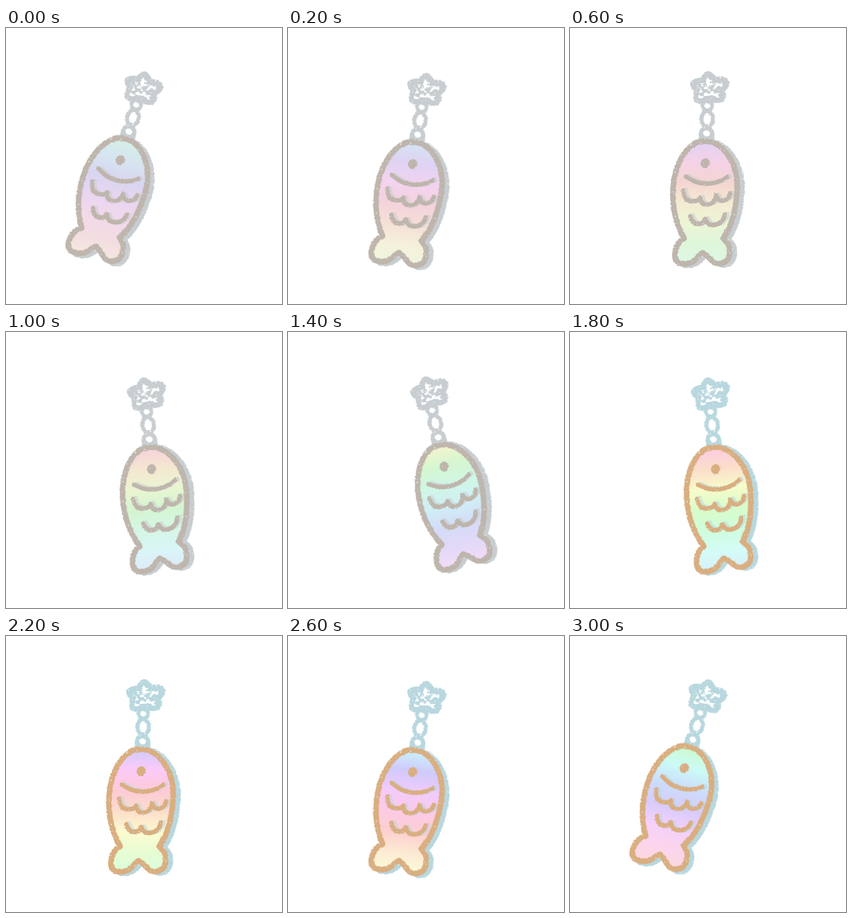
An HTML page that plays this animation: 500 by 500 pixels, repeating every 3200 ms.

```html
<!DOCTYPE html>
<html lang="en">
<head>
<meta charset="utf-8">
<title>Fish charm</title>
<style>
  html, body { margin: 0; width: 100%; height: 100%; overflow: hidden; background: #fff; }
  svg {
    display: block; width: 100vw; height: 100vh;
    fill: none; stroke-linecap: round; stroke-linejoin: round;
    --dull-line: #beb5ac; --dull-chain: #c7cdd0;
    --warm-line: #d9ae80; --warm-chain: #b8d7de;
    animation: swing 3.2s step-end infinite;
  }
  /* Pivot is the middle of the star; --h is the hue at the fish's head. */
  #charm {
    transform-origin: 0 0;
    transform: translate(var(--x), var(--y)) rotate(var(--a)) translate(-253px, -108px);
  }
  .line { stroke: var(--line); }
  .chain { stroke: var(--chain); }
  .body { fill: url(#rainbow); }
  .eye { fill: var(--line); }
  .glitter { fill: var(--chain); }
  stop { stop-color: hsl(calc(var(--h) + var(--d)) var(--s) var(--l, 89%)); }

  @keyframes swing {
    0%     { --x: 248px;   --y: 108.5px; --a: 14deg;  --h: 150; --s: 48%; --line: var(--dull-line); --chain: var(--dull-chain); }
    6.25%  { --x: 250.5px; --y: 111.5px; --a: 7deg;   --h: 207; --s: 58%; --line: var(--dull-line); --chain: var(--dull-chain); }
    18.75% { --x: 253px;   --y: 108px;   --a: 0deg;   --h: 268; --s: 62%; --line: var(--dull-line); --chain: var(--dull-chain); }
    31.25% { --x: 255px;   --y: 111.5px; --a: -7deg;  --h: 340; --s: 64%; --line: var(--dull-line); --chain: var(--dull-chain); }
    43.75% { --x: 257.5px; --y: 109px;   --a: -14deg; --h: 58;  --s: 68%; --line: var(--dull-line); --chain: var(--dull-chain); }
    50%    { --x: 257.5px; --y: 109px;   --a: -14deg; --h: 40;  --s: 90%; --line: var(--warm-line); --chain: var(--warm-chain); }
    56.25% { --x: 255px;   --y: 111.5px; --a: -7deg;  --h: 328; --s: 88%; --line: var(--warm-line); --chain: var(--warm-chain); }
    68.75% { --x: 253px;   --y: 108px;   --a: 0deg;   --h: 248; --s: 88%; --line: var(--warm-line); --chain: var(--warm-chain); }
    81.25% { --x: 250.5px; --y: 111.5px; --a: 7deg;   --h: 190; --s: 88%; --line: var(--warm-line); --chain: var(--warm-chain); }
    93.75%, 100% { --x: 248px; --y: 108.5px; --a: 14deg; --h: 120; --s: 84%; --line: var(--warm-line); --chain: var(--warm-chain); }
  }
</style>
</head>
<body>
<svg viewBox="0 0 500 500">
  <defs>
    <linearGradient id="rainbow" gradientUnits="userSpaceOnUse" x1="246" y1="205" x2="243" y2="430">
      <stop offset="0" style="--d:0"/>
      <stop offset=".167" style="--d:55"/>
      <stop offset=".333" style="--d:98"/>
      <stop offset=".5" style="--d:135"/>
      <stop offset=".667" style="--d:170; --l:90%"/>
      <stop offset=".833" style="--d:203; --l:91%"/>
      <stop offset="1" style="--d:235; --l:92%"/>
    </linearGradient>

    <!-- Ragged edges with a few worn flecks -->
    <filter id="chalk" filterUnits="userSpaceOnUse" x="150" y="60" width="200" height="400" color-interpolation-filters="sRGB">
      <feTurbulence type="fractalNoise" baseFrequency=".28" numOctaves="2" seed="4" result="noise"/>
      <feDisplacementMap in="SourceGraphic" in2="noise" scale="4" xChannelSelector="R" yChannelSelector="G" result="rough"/>
      <feColorMatrix in="noise" values="0 0 0 0 0  0 0 0 0 0  0 0 0 0 0  0 0 -9 0 7.2" result="wear"/>
      <feComposite in="rough" in2="wear" operator="in"/>
    </filter>

    <!-- Scribbled glitter inside the star -->
    <filter id="scribble" filterUnits="userSpaceOnUse" x="200" y="60" width="110" height="100" color-interpolation-filters="sRGB">
      <feTurbulence type="fractalNoise" baseFrequency=".13 .17" numOctaves="3" seed="9" result="noise"/>
      <feColorMatrix in="noise" values="0 0 0 0 0  0 0 0 0 0  0 0 0 0 0  0 0 -18 0 9.9"/>
      <feComposite in="SourceGraphic" operator="in"/>
    </filter>

    <path id="outline" d="M244 205
      C216 205 197 235 189 272 C182 310 189 352 207 381
      C195 387 189 401 190 413 C191 428 207 430 219 425
      C230 420 233 410 240 407 C248 409 253 420 262 425
      C276 431 288 422 289 409 C290 397 286 387 277 381
      C295 358 302 322 303 284 C302 244 278 206 244 205Z"/>
    <path id="star" d="M250 83 Q259 86 262 95 Q276 90 283 97 Q286 105 275 112
      Q280 122 275 130 Q262 133 252 127 Q237 136 229 130 Q227 122 231 112
      Q221 107 223 100 Q230 94 241 95 Q244 85 250 83Z"/>
    <g id="marks" stroke-width="8">
      <path d="M210 269 Q246 295 285 270"/>
      <path d="M205 294 Q206 313 221 314 Q234 314 236 307 Q238 321 248 320
        Q263 318 265 303 Q268 314 277 313 Q289 310 290 299"/>
      <path d="M218 341 Q222 356 234 355 Q243 354 245 346 Q250 358 261 357
        Q278 354 280 338"/>
    </g>
  </defs>

  <g id="charm">
    <g class="chain" filter="url(#chalk)">
      <use href="#outline" x="8" y="2" stroke-width="11"/>
      <use href="#star" stroke-width="10"/>
      <ellipse cx="249" cy="141" rx="8.5" ry="8.5" stroke-width="7"/>
      <ellipse cx="248.5" cy="165" rx="10.5" ry="14" stroke-width="7.5"/>
      <ellipse cx="247.5" cy="191" rx="10" ry="9.5" stroke-width="7.5"/>
      <path d="M237 196 V199 M258 196 V199" stroke-width="8"/>
    </g>
    <use href="#star" class="glitter" filter="url(#scribble)"/>
    <use href="#outline" class="body"/>
    <use href="#marks" class="chain" x="5" y="-1" opacity=".55" filter="url(#chalk)"/>
    <g class="line" filter="url(#chalk)">
      <use href="#outline" stroke-width="10"/>
      <use href="#marks"/>
      <ellipse class="eye" cx="245" cy="245" rx="7.5" ry="8" stroke-width="2"/>
    </g>
  </g>
</svg>
</body>
</html>
```
